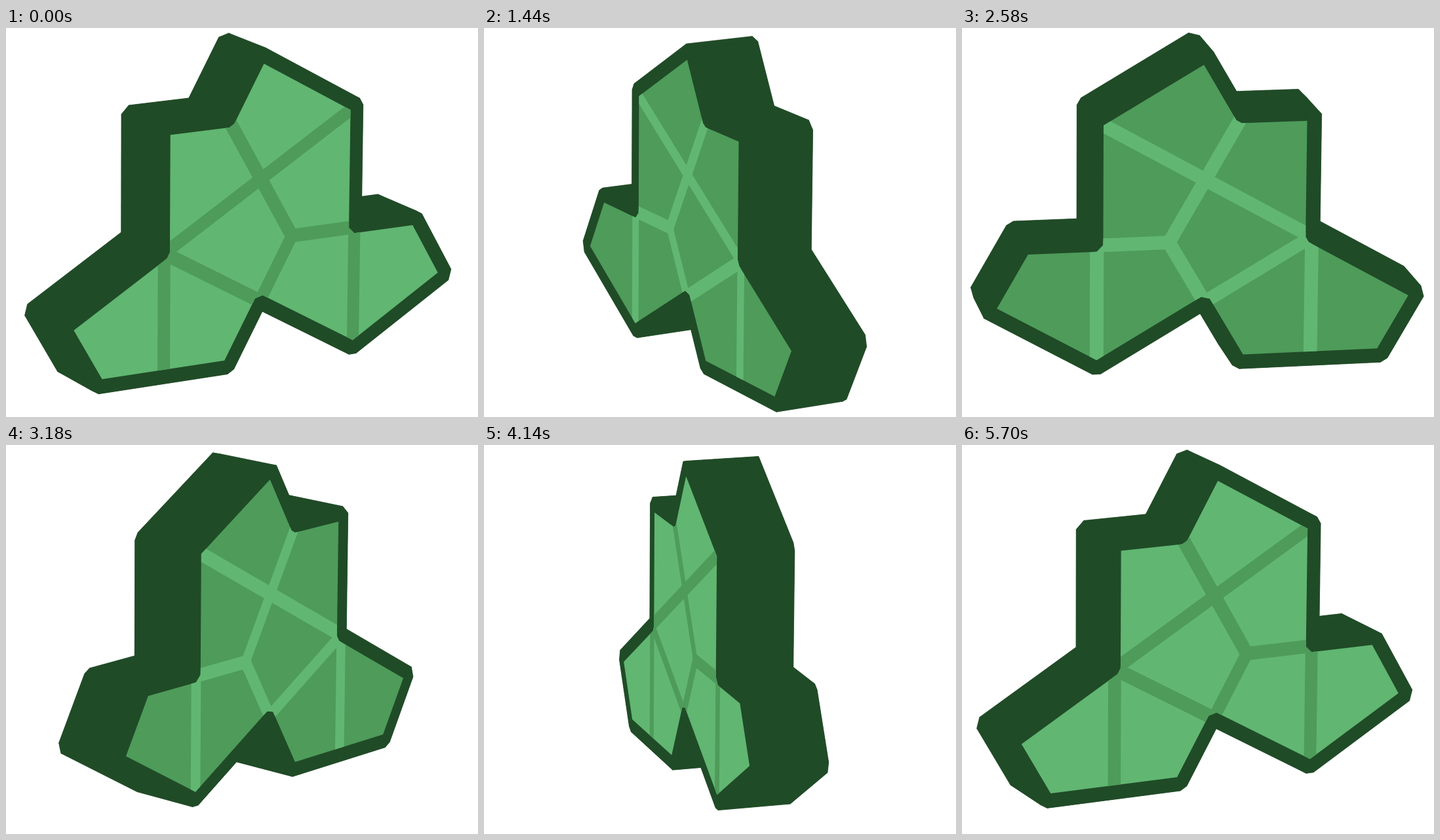
Recreate the animation shown at these times as an HTML page with a canvas. Size 720x594 px, loop 5.76 s.

```html
<!DOCTYPE html>
<html lang="en">
<head>
<meta charset="utf-8">
<title>Rotating tile</title>
<style>
  html, body { margin: 0; width: 100%; height: 100%; overflow: hidden; background: #fff; }
  canvas { display: block; }
</style>
</head>
<body>
<canvas id="stage" width="720" height="594"></canvas>
<script>
const ctx = document.getElementById('stage').getContext('2d');
const STEP = 60, COUNT = 96, START = 29.4;
const DARK = '#204b27', LIGHT = '#61b672', MID = '#4e9b5a', BLEND = '#5aaa68';
const HALF = 0.517;              // half the slab thickness
const INSET = 0.088, SEAM = 0.096, OUTSET = 0.113;
const VIEW = { x: 360, y: 296.1, sx: 110.4, sy: 107, lift: 14.6, tilt: 28.3, pitch: 0.24, dist: 64, roll: 0.008 };

// Corners of a tile built from eight kites with sides 1 and sqrt(3)
const R = Math.sqrt(3), S = R / 2;
const K = [0, 0], J = [-1.5, -S], I = [-1, -R], H = [1, -R], G = [1.5, -S],
      F = [3, -R], E = [4.5, -S], D = [4, 0], C = [3, 0], B = [3, R],
      A = [1.5, 3 * S], M = [1, R], L = [0, R], P = [2, 0], Q = [0, -R];
const tile = [K, J, I, H, G, F, E, D, C, B, A, M, L];
const seams = [[B, K], [M, P], [P, C], [P, G], [K, G], [C, F], [K, Q]];

function unit(a, b) {
  const x = b[0] - a[0], y = b[1] - a[1], l = Math.hypot(x, y);
  return [x / l, y / l];
}

// Parallel outline: bevelled where it opens, mitred where it closes
function offset(poly, d) {
  return poly.flatMap((p, i) => {
    const u = unit(poly[(i + poly.length - 1) % poly.length], p);
    const v = unit(p, poly[(i + 1) % poly.length]);
    const n = [u[1], -u[0]], m = [v[1], -v[0]];
    if ((u[0] * v[1] - u[1] * v[0]) * d > 0) {
      return [[p[0] + n[0] * d, p[1] + n[1] * d], [p[0] + m[0] * d, p[1] + m[1] * d]];
    }
    const k = d / (1 + n[0] * m[0] + n[1] * m[1]);
    return [[p[0] + (n[0] + m[0]) * k, p[1] + (n[1] + m[1]) * k]];
  });
}

function strip([a, b]) {
  const [x, y] = unit(a, b), w = SEAM, e = w * 0.577;
  return [
    [a[0] - x * e - y * w, a[1] - y * e + x * w],
    [b[0] + x * e - y * w, b[1] + y * e + x * w],
    [b[0] + x * e + y * w, b[1] + y * e - x * w],
    [a[0] - x * e + y * w, a[1] - y * e - x * w]
  ];
}

const rim = offset(tile, OUTSET);
const face = offset(tile, -INSET);
const strips = seams.map(strip);

function projector(turn, z) {
  const c = Math.cos(turn), s = Math.sin(turn), v = VIEW;
  return ([px, py]) => {
    const x0 = px - 1.5;
    const near = z * c - x0 * s;
    const k = 1 + (near + v.pitch * (py - v.lift / v.sy)) / v.dist;
    const x = k * v.sx * (x0 * c + z * s);
    const y = k * (v.lift - v.sy * py + v.tilt * near);
    return [v.x + x - y * v.roll, v.y + y + x * v.roll];
  };
}

function trace(points) {
  ctx.beginPath();
  points.forEach(p => ctx.lineTo(p[0], p[1]));
  ctx.closePath();
}

function fill(points, color) {
  trace(points);
  ctx.fillStyle = color;
  ctx.fill();
}

function solid(points) {
  fill(points, DARK);
  ctx.strokeStyle = DARK;
  ctx.lineWidth = 0.5;
  ctx.lineJoin = 'bevel';
  ctx.stroke();
}

function area(points) {
  return points.reduce((sum, p, i) => {
    const q = points[(i + 1) % points.length];
    return sum + p[0] * q[1] - p[1] * q[0];
  }, 0);
}

function draw(n) {
  const turn = (START + n * 360 / COUNT) * Math.PI / 180;
  const front = projector(turn, HALF), back = projector(turn, -HALF);
  ctx.fillStyle = '#fff';
  ctx.fillRect(0, 0, 720, 594);

  const near = rim.map(front), far = rim.map(back);
  solid(far);
  near.forEach((p, i) => {
    const j = (i + 1) % near.length;
    solid([p, near[j], far[j], far[i]]);
  });
  solid(near);

  // Screen y points down, so a face turned to the viewer has negative area
  const frontFace = face.map(front), backFace = face.map(back);
  const showFront = area(frontFace) < 0;
  if (!showFront && area(backFace) < 0) return;
  const shape = showFront ? frontFace : backFace;
  const grazing = Math.abs(Math.cos(turn)) < 0.1;
  fill(shape, grazing ? BLEND : showFront ? LIGHT : MID);
  if (grazing) return;

  ctx.save();
  trace(shape);
  ctx.clip();
  strips.forEach(s => fill(s.map(showFront ? front : back), showFront ? MID : LIGHT));
  ctx.restore();
}

const begin = performance.now();
function tick() {
  const t = Math.max(0, performance.now() - begin);
  draw(Math.floor(t / STEP) % COUNT);
  requestAnimationFrame(tick);
}
tick();
</script>
</body>
</html>
```
